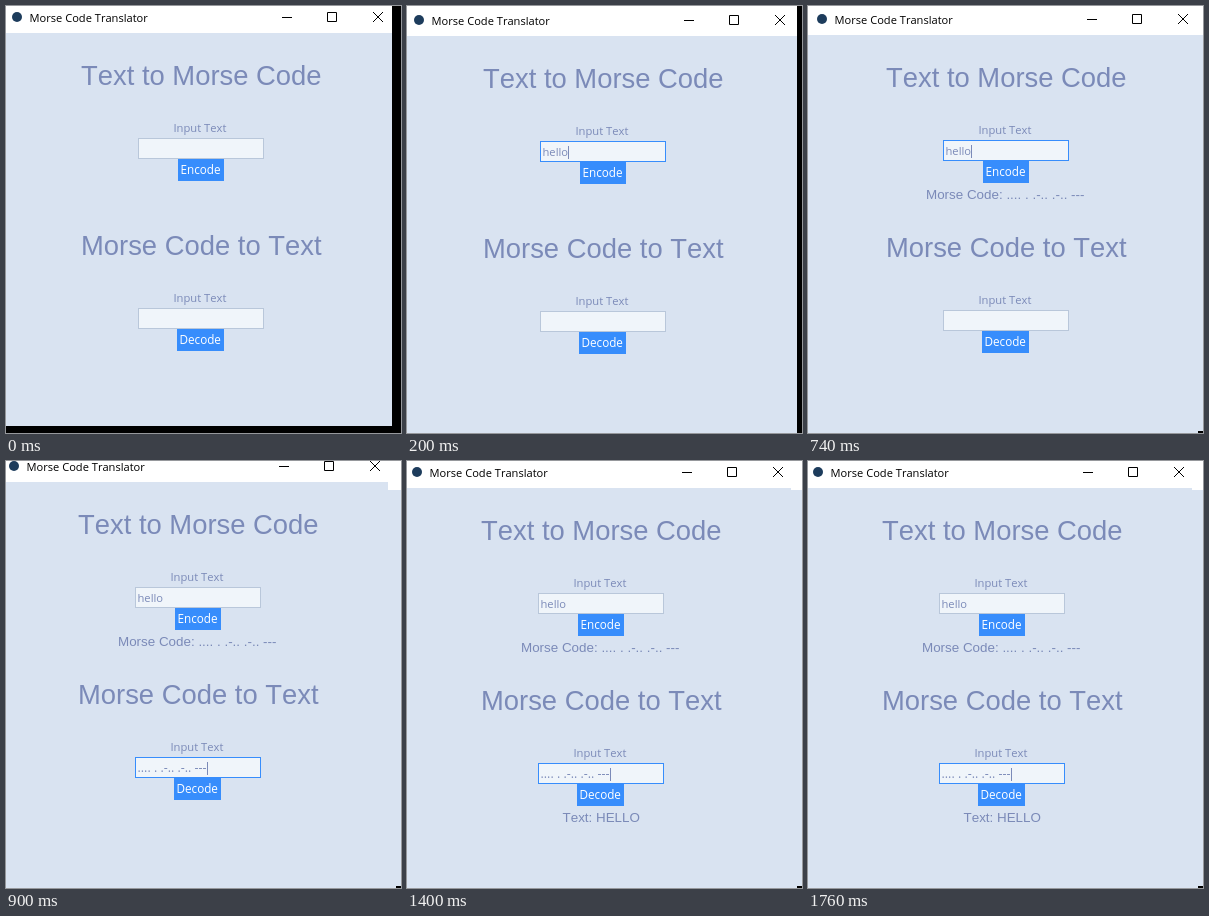
Animation, 395 px wide and 427 px high, one loop 2000 ms. Source, as an HTML page:

```html
<!DOCTYPE html>
<html lang="en">
<head>
<meta charset="utf-8">
<title>Morse Code Translator</title>
<style>
html, body { margin: 0; width: 100%; height: 100%; overflow: hidden; background: #000; }
svg { display: block; }
text { fill: #7b8ab8; white-space: pre; font-kerning: none; }
.ui { font: 500 11.2px "Open Sans", "Noto Sans", sans-serif; font-kerning: none; }
.head { font: 27.4px "Liberation Sans", Arial, sans-serif; font-kerning: none; }
.out { font: 13.4px "Liberation Sans", Arial, sans-serif; font-kerning: none; }
.code { font-size: 12.4px; }
.bar { fill: #000; font-size: 11.1px; }
.btn { fill: #fff; font-size: 11.7px; }
.entry { fill: #f0f5fa; stroke: #b9c7da; }
.entry.focus { stroke: #378dfc; }
.caret { stroke: #7b8ab8; }
.glyph { fill: none; stroke: #000; }
</style>
</head>
<body>
<svg id="stage" width="395" height="427" viewBox="0 0 395 427"></svg>
<script>
const LOOP = 2000;
const MORSE = ".... . .-.. .-.. ---";

// at: start in ms; dx, dy: window shift; w, h: visible size;
// focus: active entry; stage: how much has been filled in
const steps = [
  { at: 0,    dx: 0,  dy: 0,  w: 386, h: 420, focus: 0, stage: 0 },
  { at: 200,  dx: 1,  dy: 3,  w: 390, h: 427, focus: 1, stage: 1 },
  { at: 500,  dx: 3,  dy: 2,  w: 395, h: 427, focus: 1, stage: 2 },
  { at: 900,  dx: -3, dy: -6, w: 382, h: 427, focus: 2, stage: 3 },
  { at: 1400, dx: -1, dy: 0,  w: 384, h: 427, focus: 2, stage: 4 }
];

const rect = (x, y, w, h, fill) =>
  `<rect x="${x}" y="${y}" width="${w}" height="${h}" fill="${fill}"/>`;
const label = (x, y, cls, str) => `<text x="${x}" y="${y}" class="${cls}">${str}</text>`;

function backdrop({ dy, w, h, stage }) {
  const bar = 27 + dy;
  const settled = stage >= 2;
  let out = rect(0, 0, 395, 427, "#000");
  out += rect(0, 0, settled ? 395 : w, h, "#d9e3f1");
  out += rect(0, 0, w, bar, "#fff");
  if (settled) {
    out += rect(w, 0, 395 - w, 29, "#fff");
    out += rect(390, 425, 5, 2, "#000");
  }
  return out;
}

function titleBar() {
  return `<circle cx="11" cy="11" r="5" fill="#1d3c5c"/>` +
    label(23.5, 16, "ui bar", "Morse Code Translator") +
    `<path class="glyph" d="M276 11.5h10M321.5 6.5h9v9h-9z"/>` +
    `<path class="glyph" d="M367 6l10 10M377 6l-10 10"/>`;
}

function section(y, { heading, button, btnX, value, cls, caretX, focused, result, resultX }) {
  let out = label(75, 79, "head", heading) +
    label(167.5, 126, "ui", "Input Text") +
    `<rect class="entry${focused ? " focus" : ""}" x="132.5" y="132.5" width="125" height="20"/>` +
    label(134.5, 147, cls, value) +
    rect(btnX, 153, 218 - btnX, 22, "#378dfc") +
    label(btnX + 2.5, 168, "ui btn", button) +
    label(resultX, 191, "out", result);
  if (focused) out += `<path class="caret" d="M${caretX} 137v13"/>`;
  return `<g transform="translate(0 ${y})">${out}</g>`;
}

function scene(s) {
  const from = (stage, str) => s.stage >= stage ? str : "";
  const encode = section(0, {
    heading: "Text to Morse Code", button: "Encode", btnX: 172,
    value: from(1, "hello"), cls: "ui", caretX: 160.5, focused: s.focus === 1,
    result: from(2, "Morse Code: " + MORSE), resultX: 115
  });
  const decode = section(170, {
    heading: "Morse Code to Text", button: "Decode", btnX: 171,
    value: from(3, MORSE), cls: "ui code", caretX: 204.5, focused: s.focus === 2,
    result: from(4, "Text: HELLO"), resultX: 156.5
  });
  return backdrop(s) +
    `<g transform="translate(${s.dx} ${s.dy})">${titleBar()}${encode}${decode}</g>`;
}

const stage = document.getElementById("stage");
const start = performance.now();
let shown = null;

function draw(now) {
  const t = Math.max(0, now - start) % LOOP;
  const step = steps.findLast(s => t >= s.at);
  if (step !== shown) {
    shown = step;
    stage.innerHTML = scene(step);
  }
  requestAnimationFrame(draw);
}
draw(start);
</script>
</body>
</html>
```
